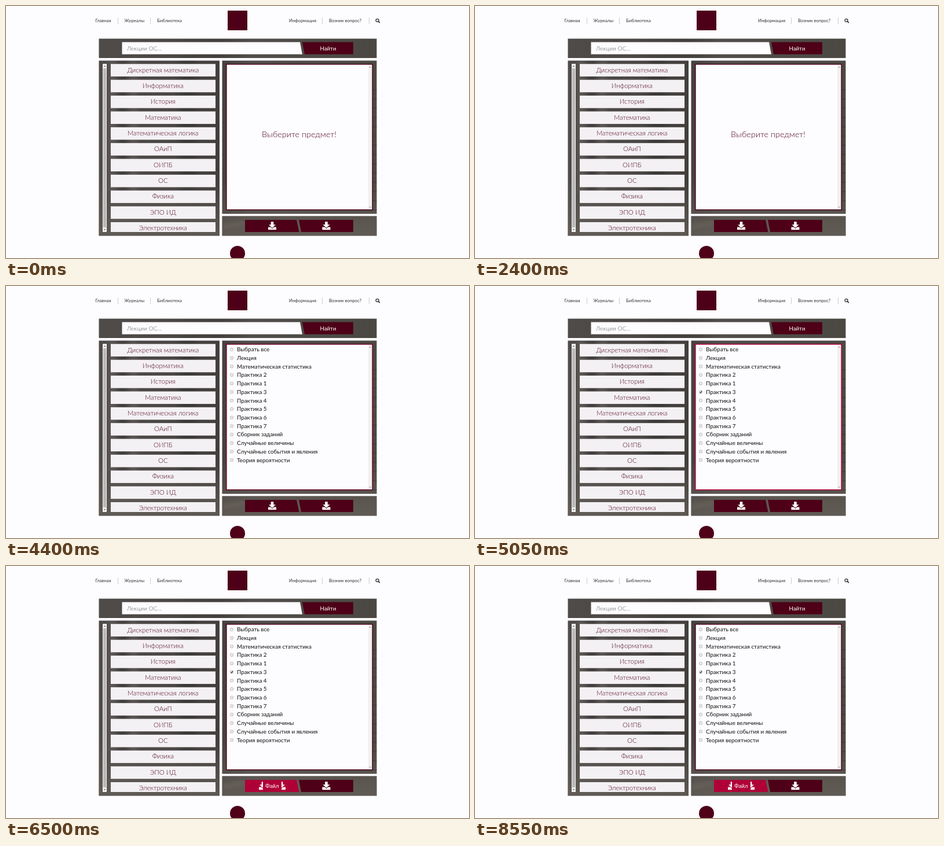
An HTML page for the animation above (8600 ms loop, 800 by 436 pixels).

```html
<!DOCTYPE html>
<html lang="ru">
<head>
<meta charset="utf-8">
<title>Библиотека</title>
<style>
  :root { --wine: #4d0018; --red: #b00038; --loop: 8.6s; }
  html, body { margin: 0; width: 100%; height: 100%; overflow: hidden; background: #fdfcfe; }
  svg { display: block; width: 800px; height: 436px; font-family: Lato, Inter, sans-serif; }
  .nav { font-size: 7.8px; fill: #333; }
  .subject { font-size: 11.3px; font-weight: 300; fill: var(--wine); text-anchor: middle; }
  .file { font-size: 9.85px; fill: #111; }
  .label { font-size: 9.7px; fill: #fff; text-anchor: middle; }
  .hint { font-size: 14.4px; font-weight: 300; fill: var(--wine); text-anchor: middle; }
  .query { font-size: 10.2px; font-weight: 300; fill: #555; }
  .wine { fill: var(--wine); }
  .frame { fill: #fdfcfe; stroke: var(--wine); stroke-width: 1.5; }

  .hover, .frame, .hint, .files, .tick, .save, .left, .right, .word {
    animation: var(--loop) linear infinite;
  }
  .hover { animation-name: hover; }
  .frame { animation-name: frame; }
  .hint { animation-name: hide; }
  .files { animation-name: show; }
  .tick { animation-name: check; }
  .save { animation-name: save; }
  .left { animation-name: left; }
  .right { animation-name: right; }
  .word { animation-name: word; }

  @keyframes hover {
    0%, 34.884% { fill: var(--wine); }
    37.209%, 46.512% { fill: var(--red); }
    48.837%, 100% { fill: var(--wine); }
  }
  @keyframes frame {
    0%, 50% { stroke: var(--wine); }
    53.488%, 67.442% { stroke: var(--red); }
    71.512%, 100% { stroke: var(--wine); }
  }
  @keyframes hide {
    0%, 38.371% { opacity: 1; }
    38.372%, 100% { opacity: 0; }
  }
  @keyframes show {
    0%, 38.371% { opacity: 0; }
    38.372%, 100% { opacity: 1; }
  }
  @keyframes check {
    0%, 55.232% { opacity: 0; }
    55.233%, 100% { opacity: 1; }
  }
  @keyframes save {
    0%, 68.314% { fill: var(--wine); }
    72.965%, 100% { fill: var(--red); }
  }
  @keyframes left {
    0%, 68.314% { transform: none; animation-timing-function: ease; }
    72.965%, 100% { transform: translateX(-16px); }
  }
  @keyframes right {
    0%, 68.314% { transform: none; animation-timing-function: ease; }
    72.965%, 100% { transform: translateX(16px); }
  }
  @keyframes word {
    0%, 68.314% { opacity: 0; }
    72.965%, 100% { opacity: 1; }
  }
</style>
</head>
<body>
<svg viewBox="0 0 800 436">
  <defs>
    <clipPath id="panels">
      <path d="M160.500 56.500h480v33.500h-480zM160.500 94.500h208.500v303h-208.500zM373.500 94.500h267v265h-267zM373.500 363.500h267v34h-267z"/>
    </clipPath>
    <clipPath id="list"><path d="M176 100h190v291h-190z"/></clipPath>
    <clipPath id="halfL"><path d="M-9-9H0V9H-9z"/></clipPath>
    <clipPath id="halfR"><path d="M0-9H9V9H0z"/></clipPath>
    <linearGradient id="wall">
      <stop offset="0" stop-color="#4f4b49"/>
      <stop offset=".25" stop-color="#4b4745"/>
      <stop offset=".43" stop-color="#433f3d"/>
      <stop offset=".55" stop-color="#514d4a"/>
      <stop offset="1" stop-color="#4b4842"/>
    </linearGradient>
    <linearGradient id="desk" x2="0" y2="1">
      <stop offset="0" stop-color="#69635b" stop-opacity="0"/>
      <stop offset="1" stop-color="#69635b" stop-opacity=".7"/>
    </linearGradient>
    <filter id="soft" x="-50%" width="200%"><feGaussianBlur stdDeviation="4"/></filter>
    <g id="icon" fill="#fff">
      <path d="M-2.300-7h4.600v5h3.700L0 3.800-6-2h3.700z"/>
      <path d="M-7 2.300h4.200L0 5l2.800-2.700H7V7H-7z"/>
    </g>
    <path id="up" d="M-1.800 1L0-1 1.800 1z" fill="#666"/>
    <path id="down" d="M-1.800-1L0 1 1.800-1z" fill="#666"/>
  </defs>

  <g id="nav" class="nav"></g>
  <g fill="none" stroke="#333" stroke-width="1.300">
    <circle cx="641.600" cy="24.800" r="2.500"/>
    <path d="M643.500 26.700l2.400 2.400" stroke-width="1.700"/>
  </g>
  <rect class="wine" x="383" y="8" width="34" height="34"/>

  <g clip-path="url(#panels)">
    <path d="M160 56h481v342h-481z" fill="url(#wall)"/>
    <g filter="url(#soft)">
      <path d="M178 94h9v230h-9zM216 94h9v230h-9z" fill="#777170" opacity=".45"/>
      <path d="M195 94h13v230h-13zM300 94h30v230h-30z" fill="#2f2b2b" opacity=".45"/>
    </g>
    <path d="M160 300h481v98h-481z" fill="url(#desk)"/>
    <path d="M374 380l40-7v3l-40 9z" fill="#a19380" opacity=".35" filter="url(#soft)"/>
    <path id="shelf" stroke="#34323a" opacity=".7"/>
  </g>

  <path d="M200.500 62.500h307.500l4 21h-311.500z" fill="#fdfcfe"/>
  <path class="wine" d="M512 62.500h88v21h-84z"/>
  <text class="query" x="209" y="76.800">Лекции ОС...</text>
  <text class="label" x="556.500" y="76.700">Найти</text>

  <path d="M167 100h7v291h-7z" fill="#f1f1f1"/>
  <path d="M168 108h5v275h-5z" fill="#b9b7b8"/>
  <use href="#up" x="170.500" y="104"/>
  <use href="#down" x="170.500" y="387"/>
  <g id="subjects" clip-path="url(#list)"></g>

  <rect class="frame" x="380.800" y="100.800" width="252.400" height="251.800"/>
  <path d="M626 102h6v249.500h-6z" fill="#f1f1f1"/>
  <use href="#up" x="629" y="105.500" opacity=".6"/>
  <use href="#down" x="629" y="348" opacity=".6"/>
  <text class="hint" x="506.500" y="227">Выберите предмет!</text>
  <g id="files" class="files"></g>

  <path class="wine save" d="M413 370h89l4.500 21h-93.500z"/>
  <path class="wine" d="M506 370h94v21h-90z"/>
  <g transform="translate(460 380.300)">
    <g class="left"><g clip-path="url(#halfL)"><use href="#icon"/></g></g>
    <g class="right"><g clip-path="url(#halfR)"><use href="#icon"/></g></g>
  </g>
  <text class="label word" x="459.800" y="384">Файл</text>
  <use href="#icon" x="553.500" y="380.300"/>

  <circle class="wine" cx="400" cy="428" r="13"/>
</svg>
<script>
  const fill = (id, items, draw) => {
    document.getElementById(id).innerHTML = items.map(draw).join('');
  };

  const links = [[154.5, 'Главная'], [204.5, 'Журналы'], [261, 'Библиотека'],
    [489, 'Информация'], [558, 'Возник вопрос?']];
  fill('nav', links, ([x, name]) => `<text x="${x}" y="28.200">${name}</text>`);
  document.getElementById('nav').innerHTML +=
    '<path d="M193.500 20v11.500M249.500 20v11.500M546.500 20v11.500M627.500 20v11.500" stroke="#ccc"/>';

  const subjects = ['Дискретная математика', 'Информатика', 'История', 'Математика',
    'Математическая логика', 'ОАиП', 'ОИПБ', 'ОС', 'Физика', 'ЭПО ИД', 'Электротехника'];
  fill('subjects', subjects, (name, i) => {
    const y = 100.3 + i * 27.37;
    return `<rect x="181" y="${y}" width="181" height="21.600" fill="#f3f1f4"/>
      <text class="subject ${i === 3 ? 'hover' : ''}" x="271.300" y="${y + 14.2}">${name}</text>`;
  });

  const files = ['Выбрать все', 'Лекция', 'Математическая статистика',
    ...[2, 1, 3, 4, 5, 6, 7].map(n => `Практика ${n}`),
    'Сборник заданий', 'Случайные величины', 'Случайные события и явления', 'Теория вероятности'];
  fill('files', files, (name, i) => {
    const y = 109.7 + i * 14.72;
    const tick = i === 5
      ? `<path class="tick" d="M388.600 ${y + .2}l1.200 1.400 2.200-3.200" fill="none" stroke="#222" stroke-width="1.100"/>`
      : '';
    return `<rect x="387.700" y="${y - 2.2}" width="4.600" height="4.600" rx=".8" fill="#f0f0f0" stroke="#aaa" stroke-width=".8"/>
      ${tick}<text class="file" x="399" y="${y + 3.5}">${name}</text>`;
  });

  // Book edges peeking out on the right
  const edges = Array.from({ length: 14 }, (_, i) => `M634 ${145 + i * 16}h7`);
  document.getElementById('shelf').setAttribute('d', edges.join(''));
</script>
</body>
</html>
```
